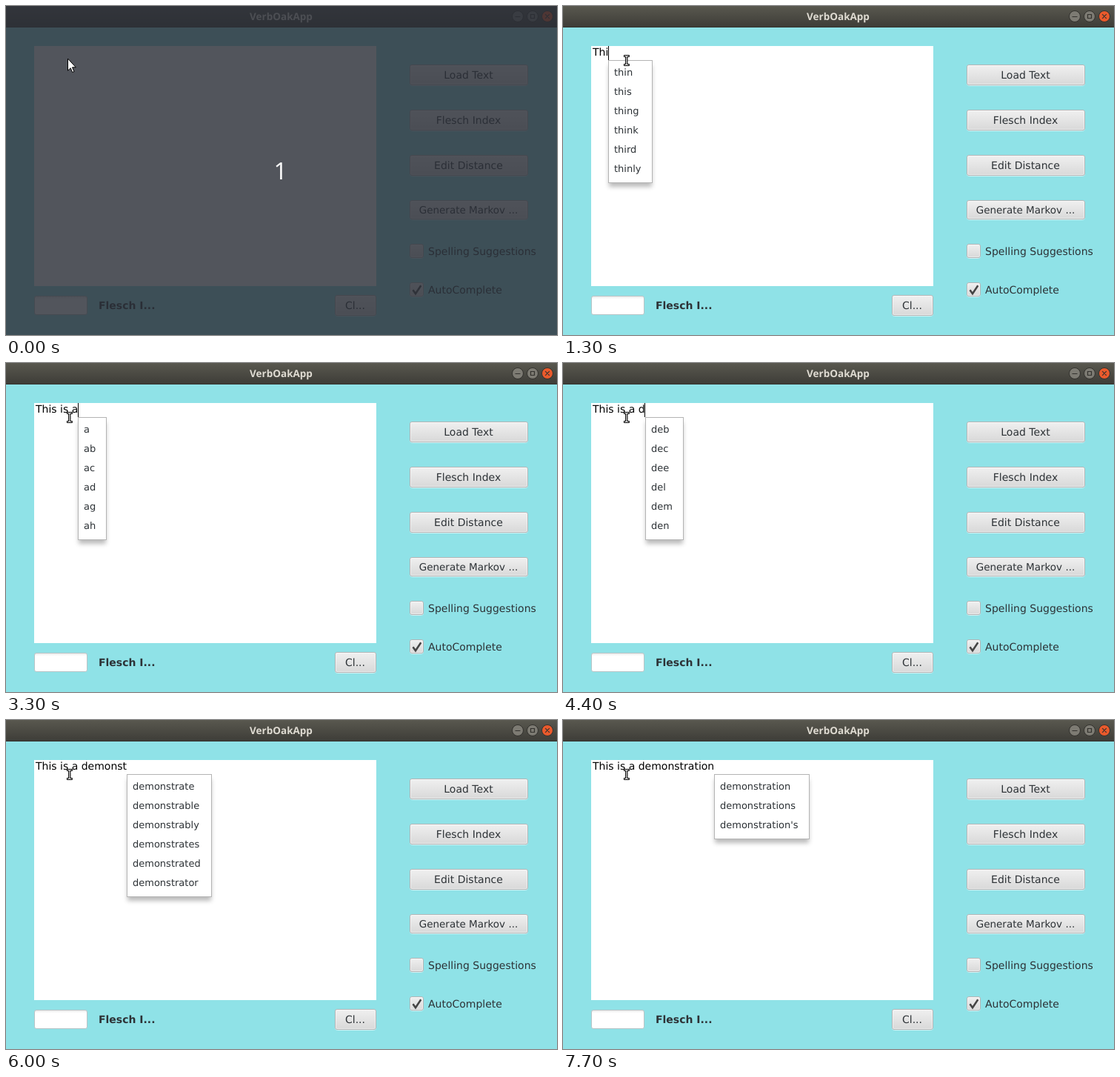
Write an HTML page that moves like this. It is 744 px wide and 444 px high and loops after 8 s.

```html
<!DOCTYPE html>
<html lang="en">
<head>
<meta charset="utf-8">
<title>Autocomplete demo</title>
<style>
  html, body { margin: 0; width: 100%; height: 100%; overflow: hidden; background: #8fe2e7; }
  body { position: relative; font: 14px "DejaVu Sans", sans-serif; text-rendering: geometricPrecision; }
  svg, #typed, #caret, #popup { position: absolute; left: 0; top: 0; }
  svg text { fill: #2d3236; }
  #typed { left: 40px; top: 54px; line-height: 19px; white-space: pre; color: #000; }
  #caret { top: 54px; width: 1px; height: 19px; background: #000; }
  #popup {
    top: 73px; padding: 4px 14px 4px 7px; border: 1px solid #b4b4b4; background: #fff;
    font-size: 13px; line-height: 26px; white-space: pre; color: #2d3236;
    box-shadow: 0 6px 6px -1px rgba(0, 0, 0, .27);
  }
</style>
</head>
<body>
<svg id="window" width="744" height="444">
  <defs>
    <linearGradient id="bar" x2="0" y2="1">
      <stop stop-color="#59584f"/><stop offset="1" stop-color="#3d3c37"/>
    </linearGradient>
    <linearGradient id="face" x2="0" y2="1">
      <stop stop-color="#f0f0f0"/><stop offset="1" stop-color="#d8d8d8"/>
    </linearGradient>
    <linearGradient id="field" x2="0" y2="1">
      <stop stop-color="#e8e8e8"/><stop offset=".16" stop-color="#fff"/>
    </linearGradient>
  </defs>
  <rect width="744" height="29" fill="url(#bar)"/>
  <rect y="28" width="744" height="1" fill="#35342f"/>
  <text x="371.5" y="19" text-anchor="middle" style="font:bold 13.5px 'Open Sans',sans-serif;fill:#dfdbd2">VerbOakApp</text>
  <g stroke="#33322e">
    <g fill="#7d7b73"><circle cx="691" cy="14" r="7.5"/><circle cx="711" cy="14" r="7.5"/></g>
    <circle cx="731" cy="14" r="7.5" fill="#ea5a2c"/>
    <path d="M687.5 14.5h7M708.5 11.5h5v5h-5zM728.2 11.2l5.6 5.6m0-5.6l-5.6 5.6" fill="none" stroke-width="1.2"/>
  </g>
  <rect x="38" y="54" width="462" height="324" fill="#fff"/>
  <rect x="38.5" y="391.5" width="71" height="25" rx="2.5" fill="url(#field)" stroke="#b9c4c6"/>
  <text x="125" y="409" font-weight="bold">Flesch I...</text>
  <g id="controls"></g>
  <path d="M549.5 383.2L553 388.3L560.3 377.3" fill="none" stroke="#444" stroke-width="2.5"/>
  <text x="570" y="336">Spelling Suggestions</text>
  <text x="570" y="388">AutoComplete</text>
</svg>
<div id="typed"></div>
<div id="caret"></div>
<div id="popup"></div>
<svg width="744" height="444">
  <g id="countdown">
    <rect width="744" height="444" fill="rgb(43,46,55)" fill-opacity=".81"/>
    <text x="361.5" y="234" style="font:32px 'Open Sans',sans-serif;fill:#fff">1</text>
    <path d="M83.5 71V87.2L87.2 83.7L89.7 89.5L92 88.5L89.5 82.8H94.3Z" fill="#fff" stroke="#000"/>
  </g>
  <g id="beam" fill="none" stroke-linecap="square">
    <path id="beamPath" d="M83.5 67.5H88M85.75 67.5V79.5M83.5 79.5H88" stroke="#000" stroke-width="3"/>
    <use href="#beamPath"/>
    <path d="M83.5 67.5H88M85.75 67.5V79.5M83.5 79.5H88" stroke="#fff" stroke-width="1.1"/>
  </g>
</svg>
<script>
const $ = id => document.getElementById(id);
const LOOP = 8000, START = 200;
const SENTENCE = "This is a demonstration";

// One row per typed character: time, suggestions, delay of the popup.
const typing = [
  [1000, "ta tb tc ti tl tm"],
  [1200, "the tho thy than that thaw"],
  [1300, "thin this thing think third thinly"],
  [1600, "this thistle thistles thistle's thistledown thistledown's"],
  [1800, ""],
  [2200, "i id if ii in is"],
  [2400, "is ism isis isle isms isaac"],
  [2800, ""],
  [3300, "a ab ac ad ag ah"],
  [3400, ""],
  [4400, "deb dec dee del dem den"],
  [4600, "deb dec dee del dem den"],
  [4700, "dem demo demon demos demur demand"],
  [5000, "demo demon demos demons demote demoted"],
  [5100, "demon demons demon's demonic demoniac demoniacal"],
  [5700, "demons demonstrate demonstrable demonstrably demonstrates demonstrated"],
  [5900, "demonstrate demonstrable demonstrably demonstrates demonstrated demonstrator", 100],
  [6300, "demonstrate demonstrable demonstrably demonstrates demonstrated demonstrator"],
  [6300, "demonstrate demonstrable demonstrably demonstrates demonstrated demonstrator", 200],
  [6800, "demonstrate demonstrates demonstrated demonstrator demonstrating demonstration"],
  [6900, "demonstrating demonstration demonstrative demonstrations demonstration's demonstratively"],
  [7000, "demonstration demonstrations demonstration's"],
  [7500, "demonstration demonstrations demonstration's"]
];
const caretToggles = [200, 700, 1200, 1700, 2200, 2600, 3200, 3700,
  4200, 4700, 5200, 5700, 6300, 6700, 7100, 7700];

function control(x, y, w, h, label = "", size = 14) {
  return `<rect x="${x + .5}" y="${y + 1.5}" width="${w - 1}" height="${h - 1}" rx="3" fill="none" stroke="#d5f2f4"/>
    <rect x="${x + .5}" y="${y + .5}" width="${w - 1}" height="${h - 1}" rx="2.5" fill="url(#face)" stroke="#b3b5b6"/>
    <rect x="${x + 1.5}" y="${y + 1.5}" width="${w - 3}" height="${h - 3}" rx="1.5" fill="none" stroke="#fff" stroke-opacity=".45"/>
    <text x="${x + w / 2 - .5}" y="${y + h / 2 + 5}" text-anchor="middle" font-size="${size}">${label}</text>`;
}
$("controls").innerHTML =
  control(545, 79, 160, 28, "Load Text") +
  control(545, 140, 160, 28, "Flesch Index") +
  control(545, 201, 160, 28, "Edit Distance") +
  control(545, 262, 160, 26, "Generate Markov ...", 13.5) +
  control(444, 390, 56, 28, "Cl...") +
  control(545, 321, 19, 19) +
  control(545, 373, 19, 19);

const pen = document.createElement("canvas").getContext("2d");
pen.font = '14px "DejaVu Sans", sans-serif';
pen.textRendering = "geometricPrecision";
const endOf = length => 40 + pen.measureText(SENTENCE.slice(0, length)).width;
const show = (id, visible) => $(id).style.display = visible ? "" : "none";

function draw(t) {
  const length = typing.filter(([time]) => time <= t).length;
  const popupLength = typing.filter(([time, , delay = 0]) => time + delay <= t).length;
  const words = popupLength ? typing[popupLength - 1][1] : "";

  $("typed").textContent = SENTENCE.slice(0, length);
  $("caret").style.left = endOf(length) - .5 + "px";
  $("popup").textContent = words.replaceAll(" ", "\n");
  $("popup").style.left = Math.round(endOf(popupLength)) + "px";

  show("caret", caretToggles.filter(time => time <= t).length % 2);
  show("popup", words);
  show("countdown", t < START);
  show("beam", t >= START);
}

const origin = performance.now();
function tick() {
  draw((performance.now() - origin) % LOOP);
  requestAnimationFrame(tick);
}
tick();
</script>
</body>
</html>
```
